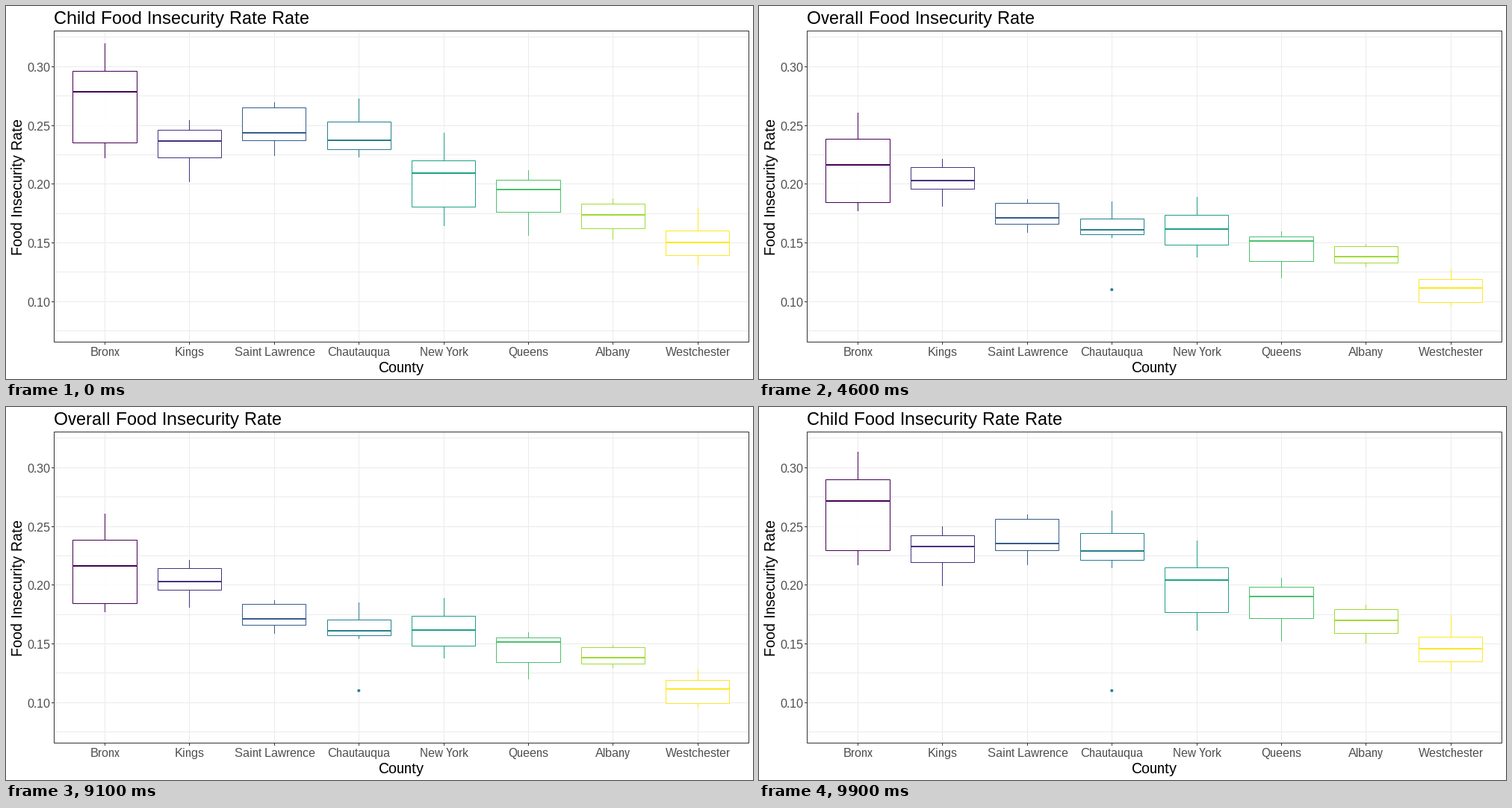
A matplotlib script that plays this animation: 1000 px wide and 500 px high, repeating every 10000 ms.

```python
import math

import matplotlib.pyplot as plt
from matplotlib.animation import FuncAnimation
from matplotlib.patches import Circle, Rectangle

plt.rcParams.update({
    "font.family": "Liberation Sans",
    "text.hinting": "native",
    "text.hinting_factor": 1,
})

W, H = 1000, 500
HOLD, STEPS = 38, 13            # still frames per state, steps of a transition
FRAMES = 2 * (HOLD + STEPS - 1)
TITLES = ("Child Food Insecurity Rate Rate", "Overall Food Insecurity Rate")
LEFT, TOP, RIGHT, BOTTOM = 64, 33, 994, 450
FIRST_X, STEP_X, HALF_BOX = 132.42, 113.4, 42.6
GRID, FRAME, TICK_TEXT = "#ebebeb", "#333333", "#4d4d4d"

# Key heights of each box (upper hinge, median, lower hinge): child, overall
COUNTIES = {
    "Bronx": ((87, 115, 183), (219, 257, 299)),
    "Kings": ((166, 181, 203), (238, 257, 263)),
    "Saint Lawrence": ((136, 170, 180), (321, 334, 342)),
    "Chautauqua": ((155, 180, 192), (343, 353, 357)),
    "New York": ((207, 224, 269), (312, 332, 343)),
    "Queens": ((233, 246, 276), (343, 346, 372)),
    "Albany": ((265, 280, 298), (348, 361, 364)),
    "Westchester": ((301, 317, 334), (395, 405, 425)),
}

fig = plt.figure(figsize=(W / 72, H / 72), dpi=72, facecolor="white")
ax = fig.add_axes([0, 0, 1, 1])
ax.set(xlim=(0, W), ylim=(H, 0))
ax.axis("off")


def pixel(value):
    """Centre of the pixel that holds a coordinate."""
    return math.floor(value) + 0.5


def mix(a, b, share):
    return a + (b - a) * share


def line(x0, y0, x1, y1, color, width=1, z=1):
    return ax.plot([x0, x1], [y0, y1], color=color, lw=width, zorder=z,
                   snap=False, solid_capstyle="butt")[0]


def outline(x, y, width, height, color, z):
    return ax.add_patch(Rectangle((x, y), width, height, fc="none", ec=color, lw=1,
                                  zorder=z, snap=False, joinstyle="miter"))


def label(x, y, text, size, color="black", ha="center", **kw):
    return ax.text(x, y, text, size=size, color=color, ha=ha,
                   va="baseline", zorder=7, **kw)


def whiskers(i, share):
    """Upper and lower whisker lengths: waves over the counties, shorter overall."""
    upper = 22 + 18 * math.cos(math.pi / 2 * (i + 0.35))
    lower = 21 + 11 * math.cos(2 * math.pi * (i - 1) / 3.7)
    return (mix(upper, upper * (0.9 - 0.1 * i), share),
            mix(lower, max(lower - 13, 1), share))


class Box:
    def __init__(self, i, x, color, states):
        self.index, self.states = i, states
        mid, left, right = pixel(x), pixel(x - HALF_BOX), pixel(x + HALF_BOX)
        self.upper = line(mid, 0, mid, 0, color, z=3)
        self.lower = line(mid, 0, mid, 0, color, z=3)
        self.fill = ax.add_patch(Rectangle((left, 0), right - left, 1, lw=0, fc="white",
                                           alpha=0.9, zorder=2, snap=False))
        self.edge = outline(left, 0, right - left, 1, color, 4)
        self.median = line(left - 0.5, 0, right + 0.5, 0, color, width=2, z=5)

    def place(self, share):
        q3, mid, q1 = (math.floor(mix(a, b, share) + 0.5) for a, b in zip(*self.states))
        up, down = (round(length) for length in whiskers(self.index, share))
        self.upper.set_ydata([q3 - up, q3])
        self.lower.set_ydata([q1 + 1, q1 + 1 + down])
        for patch in (self.fill, self.edge):
            patch.set_y(q3 + 0.5)
            patch.set_height(q1 - q3)
        self.median.set_ydata([mid, mid])


# Grid, ticks and axis text
for i in range(-1, 10):
    y = pixel(81.32 + 39.34 * i)
    line(LEFT, y, RIGHT, y, GRID)
    if i % 2 == 0:
        line(LEFT - 3, y, LEFT, y, FRAME)
        label(59, y + 6.5, f"{0.30 - 0.025 * i:.2f}", 16, TICK_TEXT, ha="right")

boxes = []
for i, (name, states) in enumerate(COUNTIES.items()):
    x = FIRST_X + STEP_X * i
    line(pixel(x), TOP, pixel(x), BOTTOM, GRID)
    line(pixel(x), BOTTOM, pixel(x), BOTTOM + 4, FRAME)
    label(pixel(x), 469, name, 16, TICK_TEXT)
    boxes.append(Box(i, x, plt.cm.viridis(i / (len(COUNTIES) - 1)), states))

outline(LEFT + 0.5, TOP + 0.5, RIGHT - LEFT, BOTTOM - TOP, FRAME, 6)
outlier = ax.add_patch(Circle((472.3, 380.2), 2, lw=0, zorder=5,
                              fc=plt.cm.viridis(3 / 7)))
title = label(64, 24, TITLES[0], 24, ha="left")
label(528.5, 491, "County", 20)
label(22, 242, "Food Insecurity Rate", 20, rotation=90, rotation_mode="anchor")


def draw(frame):
    state, local = divmod(frame, FRAMES // 2)
    step = max(0, local - HOLD + 1)
    moved = step / STEPS
    share = 1 - moved if state else moved
    for box in boxes:
        box.place(share)
    outlier.set_visible(share > 0)
    title.set_text(TITLES[(state + (step > STEPS // 2 + 1)) % 2])
    return []


anim = FuncAnimation(fig, draw, frames=FRAMES, interval=100, repeat=True,
                     repeat_delay=0, init_func=lambda: draw(0), blit=False)
plt.show()
```
